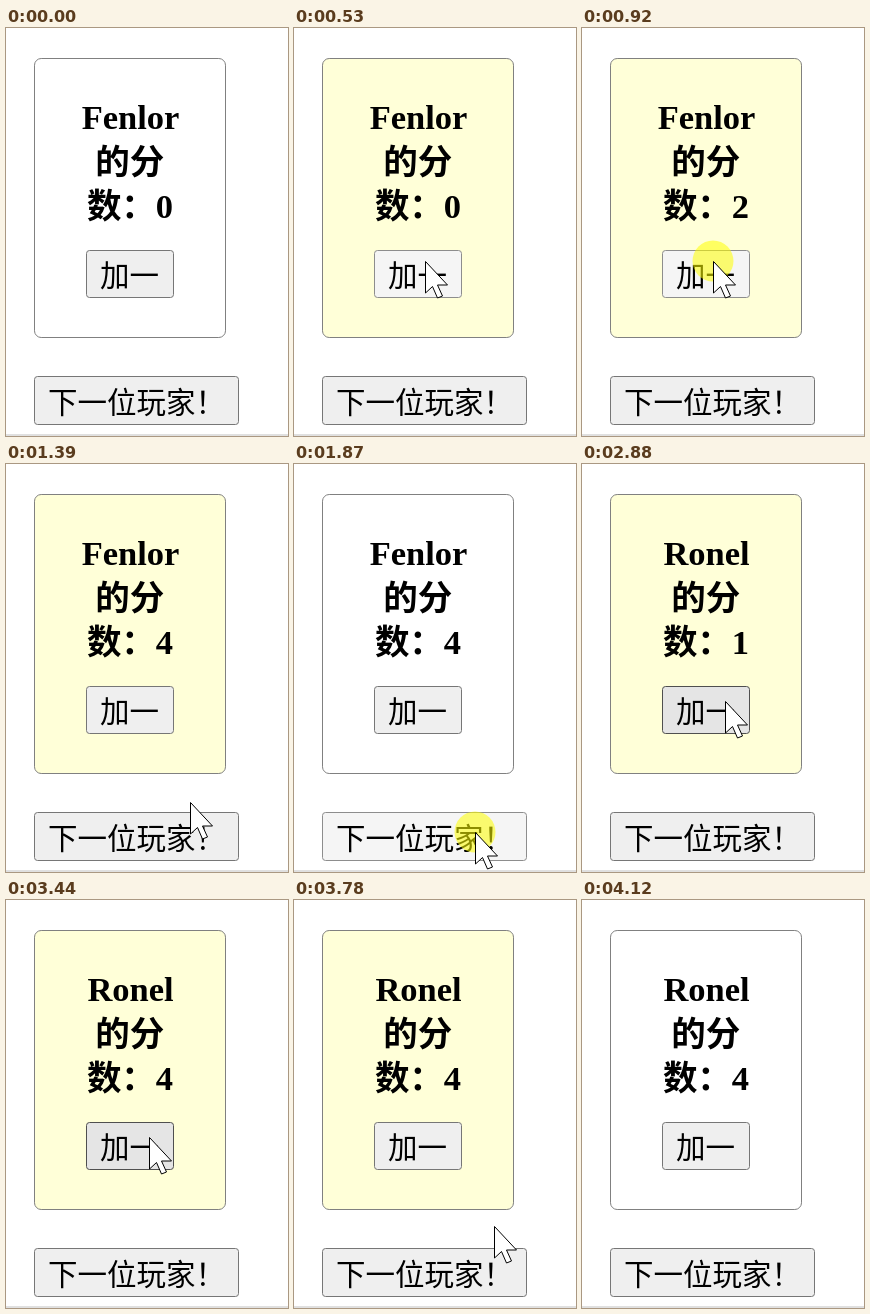
An HTML page for the animation above (4.46 s loop, 282 px wide and 408 px high).

```html
<!DOCTYPE html>
<html lang="zh-CN">
<head>
<meta charset="utf-8">
<title>计分板</title>
<style>
  html, body { margin: 0; width: 100%; height: 100%; overflow: hidden; background: #fff; }
  svg { display: block; width: 282px; height: 408px; }
  .heading { font: bold 34.5px "Liberation Serif", "Noto Sans CJK SC", "Noto Sans CJK", serif; text-anchor: middle; }
  .label { font: 29.5px "Noto Sans CJK SC", "Noto Sans CJK", sans-serif; }
</style>
</head>
<body>
<svg viewBox="0 0 282 408" lang="zh-CN">
  <rect y="406" width="282" height="2" fill="#e0e0e0"/>
  <rect id="card" x="28.5" y="30.5" width="191" height="279" rx="6.7" stroke="#808080"/>
  <g class="heading">
    <text id="player" x="124.5" y="101"></text>
    <text x="123.7" y="146">的分</text>
    <text id="score" x="124" y="190"></text>
  </g>
  <rect id="add" x="80.5" y="222.5" width="87" height="47" rx="3"/>
  <text class="label" x="94" y="258">加一</text>
  <rect id="next" x="28.5" y="348.5" width="204" height="48" rx="3"/>
  <text class="label" x="42" y="384.5">下一位玩家！</text>
  <g id="pointer">
    <circle id="halo" r="20.5" fill="#ff0" fill-opacity=".55"/>
    <path d="M.5 .5V32L7.5 25.5L12.5 37L17.5 35L12.5 24H22.5Z" fill="#fff" stroke="#000"/>
  </g>
</svg>
<script>
const LOOP = 4460;
const ENTER = 130, LEAVE = 4120;
const HOVER_LAG = 67;
const SWITCH = 2000;
const PLAYERS = ["Fenlor", "Ronel"];

// Pointer moves in discrete steps; power 1 is linear, 2 eases out.
const moves = [
  { start: 130, end: 400, steps: 5, from: [225, 420], to: [131, 233], power: 2 },
  { start: 1320, end: 1390, steps: 2, from: [131, 233], to: [184, 338], power: 1 },
  { start: 1460, end: 1740, steps: 5, from: [184, 338], to: [181, 368], power: 2 },
  { start: 2400, end: 2670, steps: 5, from: [181, 368], to: [143, 237], power: 2 },
  { start: 3570, end: 3640, steps: 2, from: [143, 237], to: [194, 307], power: 1 },
  { start: 3780, end: 4050, steps: 5, from: [194, 307], to: [223, 400], power: 1 }
];

// The halo lasts as long as the press unless haloEnd is given.
const addPresses = [
  { down: 460, up: 600, haloEnd: 530 },
  { down: 660, up: 730 },
  { down: 860, up: 930 },
  { down: 1060, up: 1120 },
  { down: 2740, up: 2880 },
  { down: 3010, up: 3080 },
  { down: 3210, up: 3270 },
  { down: 3380, up: 3440 }
];
const nextPress = { down: 1870, up: SWITCH };

const byId = id => document.getElementById(id);
const [card, player, score, add, next, pointer, halo] =
  ["card", "player", "score", "add", "next", "pointer", "halo"].map(byId);

function pointerAt(t) {
  if (t < ENTER || t >= LEAVE) return null;
  const move = moves.filter(m => t >= m.start).pop();
  const progress = Math.min(1, (t - move.start) / (move.end - move.start));
  const step = Math.floor(progress * (move.steps - 1) + 0.03) + 1;
  const k = 1 - (1 - step / move.steps) ** move.power;
  return move.from.map((v, i) => v + (move.to[i] - v) * k);
}

function contains(rect, point) {
  if (!point) return false;
  const { x, y, width, height } = rect;
  const dx = point[0] - x.baseVal.value, dy = point[1] - y.baseVal.value;
  return dx >= 0 && dy >= 0 && dx <= width.baseVal.value && dy <= height.baseVal.value;
}

const held = (press, t) => t >= press.down && t < press.up;

function paintButton(rect, hovered, pressed) {
  const [fill, stroke] = pressed ? ["#f5f5f5", "#8d8d8d"]
    : hovered ? ["#e5e5e5", "#4f4f4f"] : ["#efefef", "#767676"];
  rect.setAttribute("fill", fill);
  rect.setAttribute("stroke", stroke);
}

function render(t) {
  const tip = pointerAt(t);
  const hoverPoint = pointerAt(t - HOVER_LAG);
  const second = t >= SWITCH;
  const points = addPresses.filter(p => p.up <= t && (p.up > SWITCH) === second).length;

  player.textContent = PLAYERS[+second];
  score.textContent = "数：" + points;
  card.setAttribute("fill", contains(card, hoverPoint) ? "#ffffd8" : "#fff");
  paintButton(add, contains(add, hoverPoint), addPresses.some(p => held(p, t)));
  paintButton(next, contains(next, hoverPoint), held(nextPress, t));

  pointer.style.display = tip ? "" : "none";
  if (tip) pointer.setAttribute("transform", `translate(${tip.map(Math.round)})`);
  const glowing = [...addPresses, nextPress].some(p => t >= p.down && t < (p.haloEnd || p.up));
  halo.style.display = glowing ? "" : "none";
}

const began = performance.now();
function tick() {
  render((performance.now() - began) % LOOP);
  requestAnimationFrame(tick);
}
tick();
</script>
</body>
</html>
```
